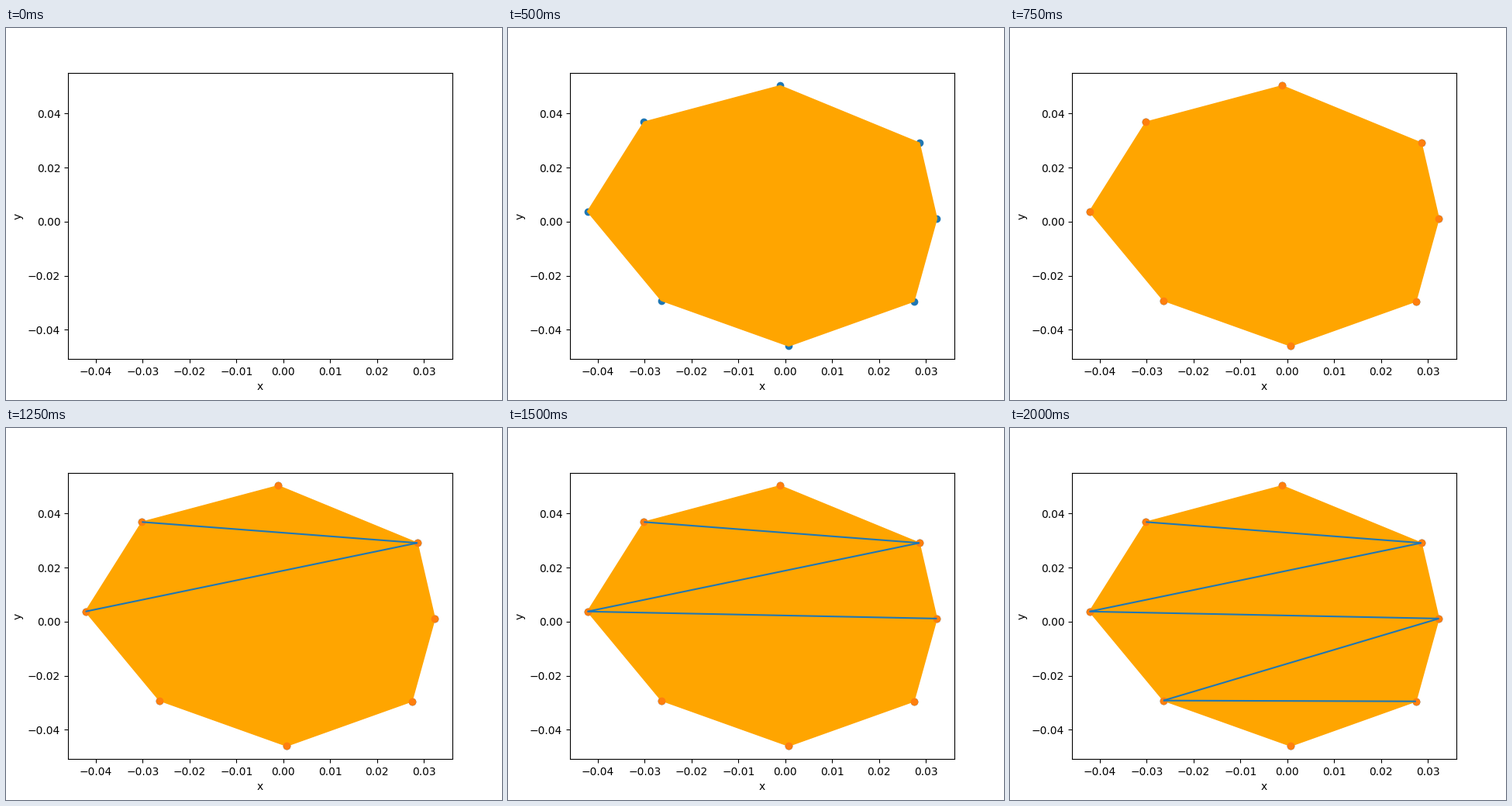
Write a matplotlib script that moves like this. It is 640x480 px and loops after 2.25 s.

```python
from itertools import pairwise

import matplotlib.pyplot as plt
from matplotlib.animation import FuncAnimation

STEP_MS = 250

# Corners of the convex polygon, counter-clockwise from the top
CORNERS = [
    (-0.00109, 0.05033), (-0.03016, 0.03688),
    (-0.04219, 0.00376), (-0.02643, -0.02919),
    (0.00073, -0.04603), (0.02745, -0.02948),
    (0.03234, 0.00115), (0.02861, 0.02914),
]


def zigzag(count):
    """Corner indices met when sweeping down, alternating left and right."""
    left, right = 1, count - 1
    while left < right:
        yield left
        yield right
        left, right = left + 1, right - 1


fig, ax = plt.subplots(figsize=(6.4, 4.8), dpi=100)
ax.set(xlabel="x", ylabel="y")

xs, ys = zip(*CORNERS)
layers = [
    ax.scatter(xs, ys, color="C0"),
    *ax.fill(xs, ys, color="orange"),
    ax.scatter(xs, ys, color="C1"),
]
for a, b in pairwise(zigzag(len(CORNERS))):
    layers += ax.plot([xs[a], xs[b]], [ys[a], ys[b]], color="C0",
                      solid_capstyle="butt")


def update(frame):
    for order, layer in enumerate(layers, start=1):
        layer.set_visible(frame >= order)
    return layers


# Settle the limits while every layer is visible
ax.autoscale_view()
ax.autoscale(False)

anim = FuncAnimation(fig, update, frames=len(layers) + 1, interval=STEP_MS,
                     init_func=lambda: update(0), repeat=True, repeat_delay=0)
plt.show()
```
